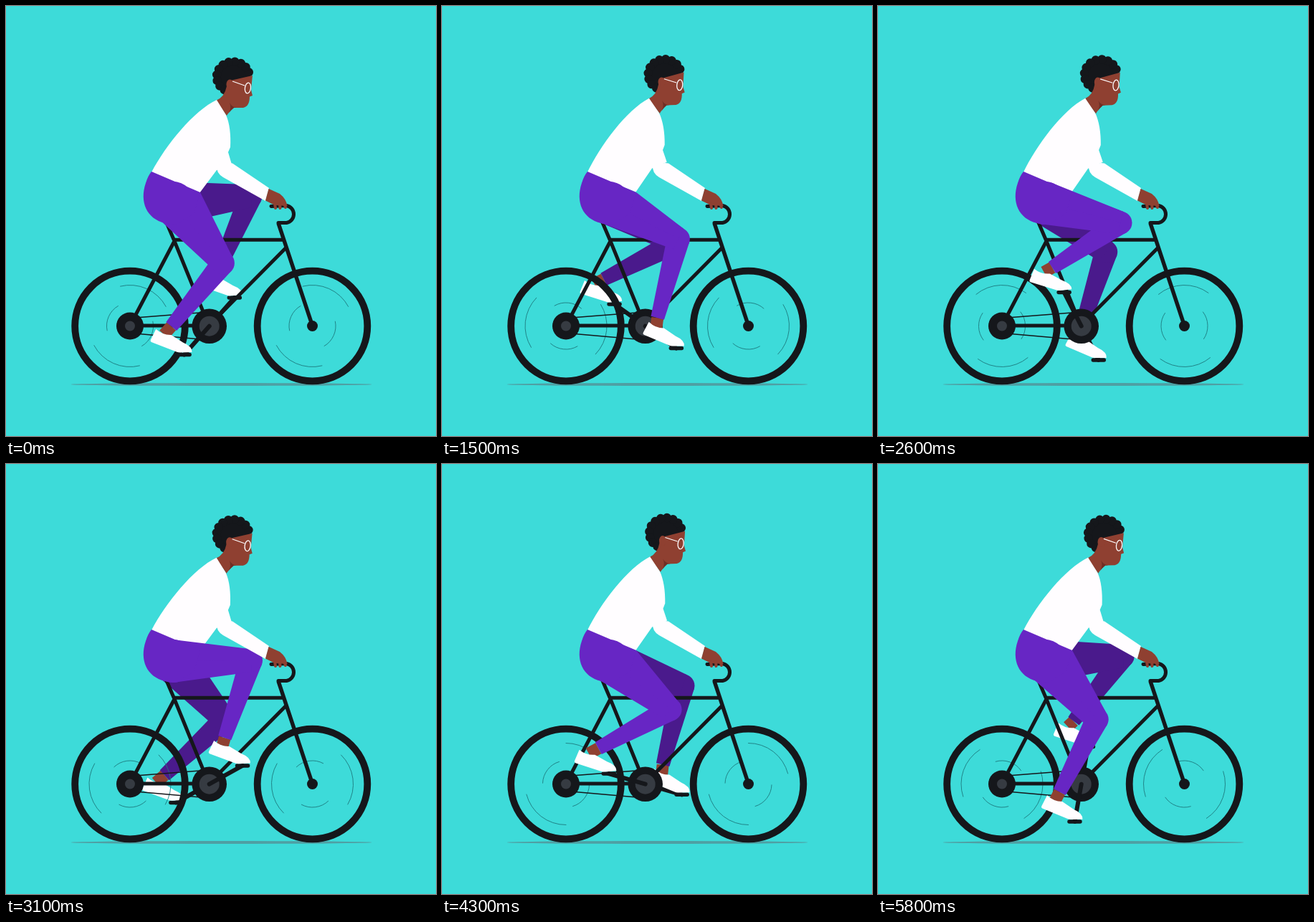
Write an HTML page with a canvas that moves like this. It is 600x600 px and loops after 5.9 s.

```html
<!DOCTYPE html>
<html lang="en">
<head>
<meta charset="utf-8">
<title>Cyclist</title>
<style>
html, body { margin: 0; width: 100%; height: 100%; overflow: hidden; background: #3ddbd9; }
canvas { display: block; }
</style>
</head>
<body>
<canvas id="stage" width="600" height="600"></canvas>
<script>
const ctx = document.getElementById('stage').getContext('2d');
const LOOP = 5900, CYCLE = LOOP / 3, STEP = 100;
const SKY = '#3ddbd9', INK = '#15171b', GREY = '#363b42', WHITE = '#fffdff';
const SKIN = '#8f4031', SHADE = '#6f2e25', NEAR = '#6726c4', FAR = '#4a1a8c';
const RAD = Math.PI / 180;
const HUB = [173, 446.5], FRONT = [427.5, 446.5], CRANK = [283.7, 446.7], HIP = [233, 275];
const CRANK_LEN = 53, THIGH = 109, SHIN = 114;
const cosd = a => Math.cos(a * RAD), sind = a => Math.sin(a * RAD);

function fill(d, color) {
  ctx.fillStyle = color;
  ctx.fill(new Path2D(d));
}

function stroke(d, color, width, cap = 'butt') {
  ctx.strokeStyle = color;
  ctx.lineWidth = width;
  ctx.lineCap = cap;
  ctx.lineJoin = 'round';
  ctx.stroke(new Path2D(d));
}

function disc([x, y], r, color) {
  ctx.fillStyle = color;
  ctx.beginPath();
  ctx.arc(x, y, r, 0, 7);
  ctx.fill();
}

function ellipse(x, y, rx, ry, color) {
  ctx.fillStyle = color;
  ctx.beginPath();
  ctx.ellipse(x, y, rx, ry, 0, 0, 7);
  ctx.fill();
}

const line = (a, b) => `M${a}L${b}`;
const polygon = (points, color) => fill('M' + points.join('L') + 'Z', color);

// Tapered segment from a to b; returns the two corners at b.
function taper(a, ra, b, rb, color) {
  const dx = b[0] - a[0], dy = b[1] - a[1], len = Math.hypot(dx, dy);
  const side = (p, r) => [p[0] + dy / len * r, p[1] - dx / len * r];
  polygon([side(a, ra), side(b, rb), side(b, -rb), side(a, -ra)], color);
  return [side(b, rb), side(b, -rb)];
}

function pedalAt(angle) {
  return [CRANK[0] + CRANK_LEN * cosd(angle), CRANK[1] + CRANK_LEN * sind(angle)];
}

function crankArm(angle) {
  const [x, y] = pedalAt(angle);
  stroke(line(CRANK, [x, y]), INK, 6, 'round');
  stroke(`M${x - 7.5} ${y}h15`, INK, 5.5, 'round');
}

// Two-bone leg whose ankle follows the pedal.
function leg(angle, color) {
  const [px, py] = pedalAt(angle);
  const cuff = [px - 20.5 - 6 * cosd(angle - 15), py - 38.5 - 4 * cosd(angle - 55)];
  const dx = cuff[0] - HIP[0], dy = cuff[1] - HIP[1], dist = Math.hypot(dx, dy);
  const bend = Math.acos((THIGH ** 2 + dist ** 2 - SHIN ** 2) / (2 * THIGH * dist));
  const dir = Math.atan2(dy, dx) - bend;
  const knee = [HIP[0] + THIGH * Math.cos(dir), HIP[1] + THIGH * Math.sin(dir)];

  stroke(line(cuff, [px - 28, py - 28]), SKIN, 17);
  ctx.save();
  ctx.translate(px, py);
  ctx.rotate((-3 + 3 * cosd(angle - 60)) * RAD);
  fill('M-38 -37L-46 -22Q-47 -20 -45 -19L-10 -4Q-8 -3 -5 -3H11Q12 -11 -1 -17L-17 -28Q-29 -28 -38 -37Z', WHITE);
  ctx.restore();

  taper(knee, 16, cuff, 9.5, color);
  disc(knee, 16, color);
  disc(HIP, 30, color);
  const [front] = taper(HIP, 30, knee, 16, color);
  return { knee, front };
}

function wheel([x, y], spin) {
  ctx.strokeStyle = INK;
  ctx.lineWidth = 9.8;
  ctx.beginPath();
  ctx.arc(x, y, 76.8, 0, 7);
  ctx.stroke();
  ctx.strokeStyle = '#1d7a7e';
  ctx.lineWidth = 0.9;
  for (const [r, offset, half] of [[57, 0, 38], [32.5, 90, 36]])
    for (const flip of [0, 180]) {
      const mid = spin + offset + flip;
      ctx.beginPath();
      ctx.arc(x, y, r, (mid - half) * RAD, (mid + half) * RAD);
      ctx.stroke();
    }
}

function bike(spin) {
  wheel(HUB, spin);
  wheel(FRONT, spin);
  stroke('M220 293L235 328L283 446M235 328L173 446H283', INK, 5);
  stroke('M235 326.3H388M391 337L283 446', INK, 5);
  stroke('M380 303L427.5 446', INK, 5.5);
  stroke('M380 302.5H391.5A12.2 12.2 0 0 0 391.5 278.5L370 279.5', INK, 5, 'round');
  stroke('M180 435L283 427M180 457L283 466', INK, 1.3);
  disc(HUB, 19, INK);
  disc(HUB, 7, GREY);
  disc(FRONT, 7.5, INK);
  disc(CRANK, 24.3, INK);
  disc(CRANK, 14, GREY);
}

function upperBody() {
  const bumps = 11;
  ellipse(317, 99, 23, 21.5, INK);
  for (let i = 0; i < bumps; i++) {
    const a = -18 - 22 * i;
    disc([317 + 23 * cosd(a), 99 + 21.5 * sind(a)], 6.2, INK);
  }
  fill('M309 105L344 97L342 117L344 125L340 126.5Q340 140 331 142H318Q310 149 308 153L293 132Q305 127 308 112Z', SKIN);
  fill('M312 135Q315 141 322 142H318Q314 145 311 149Q315 142 312 135Z', SHADE);
  ellipse(312.5, 109.5, 5, 7, SKIN);
  stroke('M316 105L333 111', WHITE, 1.2);
  ctx.lineWidth = 1.3;
  ctx.beginPath();
  ctx.ellipse(337.5, 114.5, 4, 7.4, 8 * RAD, 0, 7);
  ctx.stroke();
  fill('M294 131C262 146 223 194 203 232L270 261L294 229L315 221L310 204L313 197C314 180 312 163 307 152Z', WHITE);
}

function forearm() {
  fill('M311 219L316 219.5L367 254L362 272L303 239Q293 233 294 222Z', WHITE);
  fill('M366.5 255L382 262Q391 269 392.5 279L375 278L362 271.5Z', SKIN);
  stroke('M375 276L376 282M382 276L382.5 282M388 275L390 281', SKIN, 4, 'round');
}

function draw(time) {
  const phase = time % CYCLE;
  const angle = 131.5 + 0.176 * phase;
  const half = CYCLE / 2;
  const d = ((phase - 50) / half + 1) % 1;
  const u = 1 - Math.abs(1 - 2 * d);
  const lean = u * u * u * (u * (6 * u - 15) + 10);

  ctx.fillStyle = SKY;
  ctx.fillRect(0, 0, 600, 600);
  ellipse(300.5, 528, 210, 2, '#4f9fa3');

  crankArm(angle + 180);
  leg(angle + 180, FAR);
  bike(0.528 * phase - 66);
  crankArm(angle);

  ctx.save();
  ctx.translate(235, 250);
  ctx.rotate(-2.4 * RAD * lean);
  ctx.translate(-235, -250);
  upperBody();
  ctx.restore();

  const { knee, front } = leg(angle, NEAR);
  polygon([[271, 260], front, knee, HIP], NEAR);
  fill('M203 231L271 260L262 290L240 304Q232 306 222 303C196 297 186 273 195 247Q198 237 203 231Z', NEAR);
  forearm();
}

const start = performance.now();
function tick() {
  const t = (performance.now() - start) % LOOP;
  draw(Math.floor(t / STEP) * STEP);
  requestAnimationFrame(tick);
}
tick();
</script>
</body>
</html>
```
